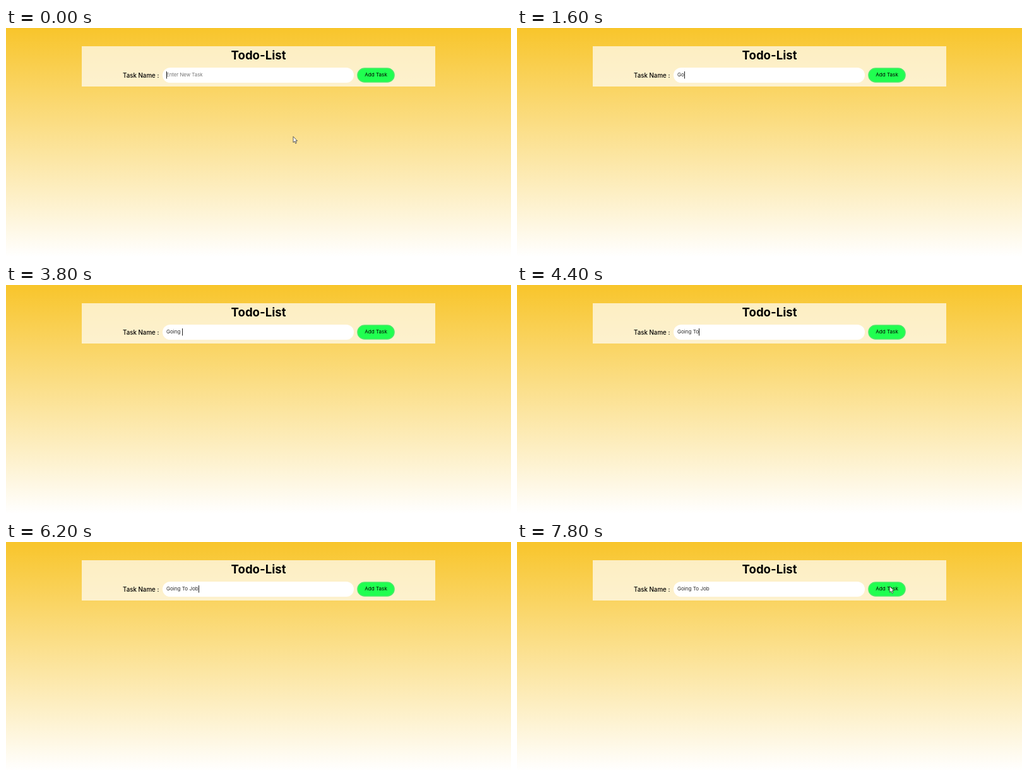
These frames come from a looping animation (800x364 px, 8 s). An HTML page:

```html
<!DOCTYPE html>
<html lang="en">
<head>
<meta charset="utf-8">
<title>Todo-List</title>
<style>
  html, body { margin: 0; width: 100%; height: 100%; overflow: hidden; }
  svg { display: block; width: 100vw; height: 100vh; }
  text { font-family: Inter, sans-serif; white-space: pre; }
</style>
</head>
<body>
<svg viewBox="0 0 800 364">
  <defs>
    <linearGradient id="sky" x2="0" y2="1">
      <stop stop-color="#f8c52b"/>
      <stop offset="1" stop-color="#fff"/>
    </linearGradient>
  </defs>
  <rect width="800" height="364" fill="url(#sky)"/>
  <rect x="120" y="29" width="560" height="64" fill="#fff" fill-opacity=".69"/>
  <text x="400" y="50" font-size="18.6" font-weight="700" text-anchor="middle">Todo-List</text>
  <text x="185" y="78.6" font-size="9.75" font-weight="500">Task Name :</text>
  <rect x="248" y="63" width="303" height="24" rx="12" fill="#fff"/>
  <rect x="557" y="64" width="58" height="22" rx="11" fill="#20ff50" stroke="#4bea68" stroke-width="1.6"/>
  <text x="586" y="77.4" font-size="8.1" text-anchor="middle">Add Task</text>
  <text id="field" x="254" y="77.4"></text>
  <rect id="caret" y="69" width="1" height="11.5" fill="#222"/>
  <path id="pointer" d="M.5 .5V10L2.6 8L4.2 11.5L5.7 10.8L4.2 7.4H7Z"
        fill="#fff" stroke="#333" stroke-width=".8" stroke-linejoin="round"/>
</svg>
<script>
const LOOP = 8000;
const TASK = "Going To Job";
const keyTimes = [1200, 1600, 1800, 2200, 2400, 2600, 4000, 4400, 4800, 5200, 5600, 6000];
const caretHidden = [[400, 1000], [3200, 3800], [6800, 7400], [7800, LOOP]];
// Pointer steps: start time, then position (none while typing).
const pointerSteps = [
  [0, 454.5, 172], [1200], [7200, 694, 81], [7400, 621, 58], [7600, 582, 81], [7800, 590, 70]
];

const [field, caret, pointer] = ["field", "caret", "pointer"].map(id => document.getElementById(id));
const show = (element, visible) => element.setAttribute("visibility", visible ? "visible" : "hidden");

function setField(content, color, size) {
  field.textContent = content;
  field.setAttribute("fill", color);
  field.setAttribute("font-size", size);
}

function render(t) {
  const count = keyTimes.filter(time => time <= t).length;
  if (count) setField(TASK.slice(0, count), "#2b2b2b", 8.05);
  else setField("Enter New Task", "#757575", 7.8);

  caret.setAttribute("x", Math.round(254 + (count ? field.getComputedTextLength() : 0)));
  show(caret, !caretHidden.some(([from, to]) => t >= from && t < to));

  const [, x, y] = pointerSteps.filter(([time]) => time <= t).pop();
  show(pointer, x !== undefined);
  if (x !== undefined) pointer.setAttribute("transform", `translate(${x} ${y})`);
}

const start = performance.now();
function tick() {
  render((performance.now() - start) % LOOP);
  requestAnimationFrame(tick);
}
tick();
</script>
</body>
</html>
```
